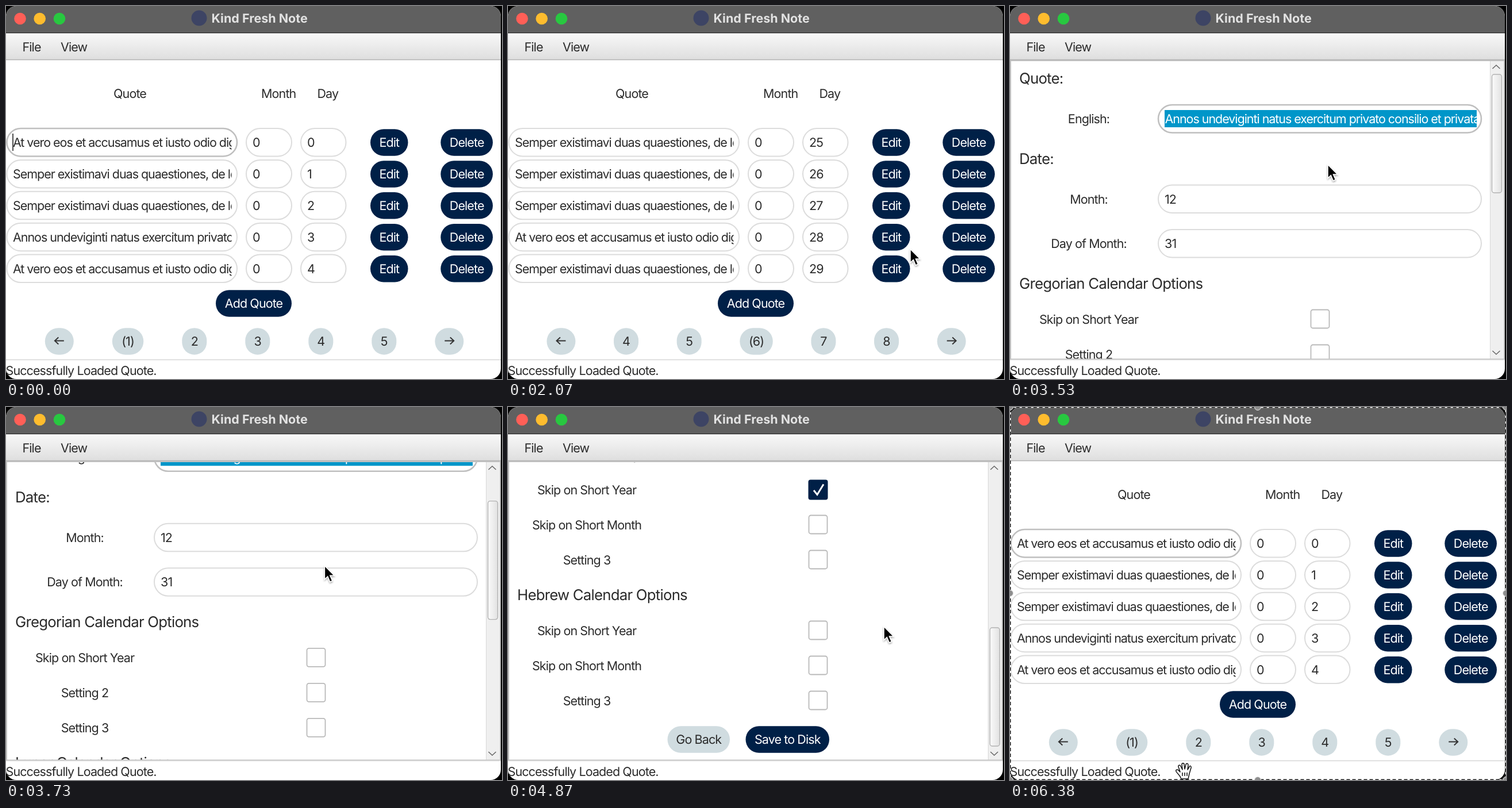
An HTML page for the animation above (6420 ms loop, 863 px wide and 649 px high).

```html
<!DOCTYPE html>
<html lang="en">
<head>
<meta charset="utf-8">
<title>Kind Fresh Note</title>
<style>
html, body { margin: 0; width: 100%; height: 100%; overflow: hidden; background: #000; }
svg { display: block; width: 863px; height: 649px; }
text { font: 21.5px Inter, Roboto, sans-serif; font-optical-sizing: none; letter-spacing: -.9px; fill: #2b2b2b; white-space: pre; text-rendering: geometricPrecision; }
.quote { letter-spacing: -1.04px; }
.head { font-size: 25.8px; letter-spacing: -.78px; }
.title { font-weight: 700; letter-spacing: 0; fill: #e2e2e2; }
.light { fill: #fff; }
.field { fill: #fff; stroke: #dcdcdc; stroke-width: 2; }
.focus { stroke: #bfbfbf; stroke-width: 2.6; }
.box { fill: #fff; stroke: #b9b9b9; stroke-width: 1.8; }
.line { fill: none; stroke: #333; stroke-width: 1.9; }
</style>
</head>
<body>
<svg viewBox="0 0 863 649">
  <defs>
    <linearGradient id="menu" x2="0" y2="1"><stop stop-color="#f8f8f8"/><stop offset="1" stop-color="#dedede"/></linearGradient>
    <linearGradient id="thumbFill"><stop stop-color="#fafafa"/><stop offset="1" stop-color="#e2e2e2"/></linearGradient>
    <clipPath id="window"><rect width="861" height="649" rx="18"/></clipPath>
    <clipPath id="quotes"><rect x="10" y="200" width="382.5" height="290"/></clipPath>
    <clipPath id="pane"><rect x="2" y="96" width="833" height="518"/></clipPath>
    <clipPath id="entry"><rect x="268" y="170" width="544" height="52"/></clipPath>
    <filter id="shadow" x="-50%" y="-50%" width="200%" height="200%"><feDropShadow dx="0" dy="2" stdDeviation="1.5" flood-opacity=".35"/></filter>
  </defs>
  <rect width="863" height="649"/>
  <g clip-path="url(#window)">
    <rect width="861" height="649" fill="#fff"/>
    <g id="list"></g>
    <g id="form">
      <g clip-path="url(#pane)"><g id="content"></g></g>
      <rect x="835" y="95" width="24" height="519" fill="#efefef"/>
      <path d="M835.5 95V614" stroke="#d8d8d8"/>
      <rect id="thumb" x="838.5" width="17" height="206" rx="4" fill="url(#thumbFill)" stroke="#b2b2b2" stroke-width="1.4"/>
      <path class="line" d="M839.5 109l6.5-6 6.5 6M839.5 600l6.5 6 6.5-6" style="stroke:#666;stroke-width:1.5"/>
      <rect x="1" y="95" width="859" height="519.5" fill="none" stroke="#c4c4c4" stroke-width="2"/>
    </g>
    <path d="M0 615.5H861" stroke="#d6d6d6" stroke-width="1.5"/>
    <text x="-.5" y="642">Successfully Loaded Quote.</text>
    <rect width="861" height="47" fill="#606060"/>
    <rect y="46" width="861" height="1.6" fill="#252525"/>
    <rect y="47.6" width="861" height="46" fill="url(#menu)"/>
    <path d="M0 93.5H861" stroke="#b3b3b3" stroke-width="1.5"/>
    <circle cx="24.500" cy="22" r="10.300" fill="#ff5f57"/>
    <circle cx="58.700" cy="22" r="10.300" fill="#febc2e"/>
    <circle cx="93" cy="22" r="10.300" fill="#28c840"/>
    <circle cx="336" cy="21" r="13.500" fill="#3d4464"/>
    <text class="title" x="357.500" y="29.300">Kind Fresh Note</text>
    <text x="28.500" y="78.500">File</text>
    <text x="95" y="78.500">View</text>
  </g>
  <g id="frame">
    <rect x=".7" y=".7" width="861.600" height="647.600" fill="none" stroke="#fff" stroke-width="1.500"/>
    <rect x=".7" y=".7" width="861.600" height="647.600" fill="none" stroke="#222" stroke-width="1.500" stroke-dasharray="6 4"/>
    <g id="grips" fill="#8e8e8e" stroke="#e8e8e8"></g>
  </g>
  <path id="arrow" d="M0 0V23.500L5.300 18.500 9.300 28 13.400 26.200 9.400 17H16.800Z" fill="#000" stroke="#fff" stroke-width="1.500" filter="url(#shadow)"/>
  <path id="hand" transform="translate(288 618)" d="M9 27C7 22 3 20 1 16C0 13 3 12 5 14L8 17L5 8C4 5 8 4 9 7L12 13L11 4C11 1 15 1 15 4L16 12L18 4C19 1 22 2 22 5L21 13L24 8C25 5 28 7 27 10L24 20L22 29H10ZM12 18V24M16 18V24M20 18V24" fill="#fff" stroke="#111" stroke-width="1.500" stroke-linejoin="round"/>
</svg>
<script>
const LOOP = 6420, NAVY = '#002047', PALE = '#d0dce0', DARK = '#b9c5ca';
const $ = id => document.getElementById(id);
const quotes = {
  T: 'At vero eos et accusamus et iusto odio dignissimos',
  S: 'Semper existimavi duas quaestiones, de legibus',
  A: 'Annos undeviginti natus exercitum privato consilio et privata impensa'
};
const order = 'TSSATASTSAATAATSATASTSATASSSTS';
const clicks = [790, 1020, 1260, 1490, 1720];
const OPEN = 2830, BACK = 5670, GRAB = 6330;
const track = [
  [250, 480, 660], [670, 763, 567], [1800, 763, 567], [2070, 700, 423],
  [2620, 683, 234], [2900, 683, 234], [3400, 553, 276], [3640, 553, 276],
  [4070, 565, 278], [4550, 610, 330], [4870, 654, 382], [5330, 331, 575],
  [5760, 331, 575], [6300, 300, 630]
];

const text = (x, y, s, cls = '', anchor = 'start') =>
  `<text x="${x}" y="${y + 8}" class="${cls}" text-anchor="${anchor}">${s}</text>`;
const mid = (x, y, s, cls) => text(x, y, s, cls, 'middle');
const rect = (x, y, w, h, r, attr) =>
  `<rect x="${x}" y="${y}" width="${w}" height="${h}" rx="${r}" ${attr}/>`;
const field = (x, y, w, focus) =>
  rect(x, y - 24, w, 48.5, 24.2, `class="field ${focus ? 'focus' : ''}"`);
const button = (x, y, w, s, fill = NAVY, id = '') =>
  rect(x, y - 23.3, w, 46.5, Math.min(23.2, w / 2), `fill="${fill}" id="${id}"`) +
  mid(x + w / 2, y - .7, s, fill === NAVY ? 'light' : '');

// Pager buttons share the leftover width evenly.
function pager(page) {
  const first = Math.max(1, page - 2), items = [['left', 50]];
  for (let n = first; n < first + 5; n++) {
    const w = n === 1 ? 40 : 43;
    items.push(n === page ? [`(${n})`, w + 14.5] : [n, w]);
  }
  items.push(['right', 50]);
  const gap = (862.5 - items.reduce((a, i) => a + i[1], 0)) / 8;
  let x = gap + .8, out = '';
  for (const [s, w] of items) {
    const c = x + w / 2, isArrow = w === 50, d = s === 'left' ? -1 : 1;
    out += button(x, 583.5, w, isArrow ? '' : s, PALE, s === 'right' ? 'next' : '');
    if (isArrow) out += `<path class="line" d="M${c - 8 * d} 582.5h${16 * d}m${-6.5 * d} -6l${6.5 * d} 6l${-6.5 * d} 6"/>`;
    x += w + gap;
  }
  return out;
}

function listView(page) {
  let out = mid(215.5, 152, 'Quote') + mid(474.2, 152, 'Month') + mid(559.8, 152, 'Day');
  let words = '';
  for (let i = 0; i < 5; i++) {
    const y = 237 + i * 54.9, day = (page - 1) * 5 + i;
    out += field(1.5, y, 400.5, page === 1 && i === 0) + field(418, y, 79, 0) + field(513, y, 78.5, 0);
    out += text(429, y, 0) + text(524, y, day);
    out += button(634, y + .6, 65.5, 'Edit', NAVY) + button(756.3, y + .6, 90.7, 'Delete');
    words += text(12, y, quotes[order[day]], 'quote');
  }
  out += `<g clip-path="url(#quotes)">${words}</g>`;
  if (page === 1) out += '<path id="caret" d="M12 222V252" stroke="#222" stroke-width="1.6"/>';
  return out + button(365, 517.5, 132, 'Add Quote') + pager(page);
}

function formView() {
  let out = text(16, 127, 'Quote:', 'head') + mid(137, 196, 'English:') + field(258, 196, 562, 1);
  out += `<g clip-path="url(#entry)">${rect(269, 181, 545, 30, 0, 'fill="#0096c9"')}${text(269.5, 196, quotes.A, 'quote light')}</g>`;
  out += text(16, 267, 'Date:', 'head');
  out += mid(137, 336, 'Month:') + field(258, 335.5, 562, 0) + text(269, 336, 12);
  out += mid(137, 413, 'Day of Month:') + field(258, 413, 562, 0) + text(269, 413, 31);
  ['Gregorian', 'Lunar', 'Hebrew'].forEach((name, g) => {
    const top = 484 + g * 245;
    out += text(16, top, name + ' Calendar Options', 'head');
    ['Skip on Short Year', g ? 'Skip on Short Month' : 'Setting 2', 'Setting 3'].forEach((s, i) => {
      const y = top + 61 * (i + 1);
      out += mid(137, y, s);
      out += g === 1 && i === 0
        ? rect(522.5, y - 17.5, 34, 35, 4, `fill="${NAVY}"`) +
          `<path d="M532 ${y + 1}l6 7.500 11-18" fill="none" stroke="#fff" stroke-width="3"/>`
        : rect(523.5, y - 16.5, 32, 32, 3.5, 'class="box"');
    });
  });
  return out + button(277.5, 1224.5, 108.5, 'Go Back', PALE, 'back') + button(413.5, 1224.5, 145.5, 'Save to Disk');
}

function cursorAt(t) {
  let i = 1;
  while (i < track.length - 1 && track[i][0] < t) i++;
  const [a, x, y] = track[i - 1], [b, u, v] = track[i];
  const k = Math.max(0, Math.min(1, (t - a) / (b - a))), e = k * k * (3 - 2 * k);
  return [x + (u - x) * e, y + (v - y) * e];
}

const show = (id, on) => $(id).setAttribute('display', on ? 'inline' : 'none');
let shown = 0;

function draw(t) {
  const inForm = t >= OPEN && t < BACK;
  const page = t >= BACK ? 1 : 1 + clicks.filter(c => t >= c).length;
  if (page !== shown) $('list').innerHTML = listView(shown = page);
  show('list', !inForm);
  show('form', inForm);

  const u = Math.max(0, Math.min(1, (t - 3640) / 1034));
  const scroll = 646 * (1 - (1 - u) ** 2);
  $('content').setAttribute('transform', `translate(0 ${-scroll})`);
  $('thumb').setAttribute('y', 119 + scroll * 265 / 646);

  const [x, y] = cursorAt(t);
  $('arrow').setAttribute('transform', `translate(${x} ${y})`);
  show('arrow', t >= 250 && t < GRAB);
  show('hand', t >= GRAB);
  show('frame', t >= GRAB);

  const overNext = t > 300 && x > 745 && x < 795 && y > 560 && y < 607;
  $('next').setAttribute('fill', overNext ? DARK : PALE);
  const press = Math.max(0, Math.min(1, (t - 5370) / 160));
  $('back').setAttribute('fill', `rgb(${208 - 23 * press},${220 - 23 * press},${224 - 22 * press})`);
  if (page === 1) show('caret', t < 500 || (t >= BACK && t < 6170));
}

$('content').innerHTML = formView();
for (const gx of [0, 431, 863]) for (const gy of [0, 324, 649])
  if (gx !== 431 || gy !== 324) $('grips').innerHTML += `<circle cx="${gx}" cy="${gy}" r="5.5"/>`;

const start = performance.now();
function tick() {
  draw((performance.now() - start) % LOOP);
  requestAnimationFrame(tick);
}
tick();
</script>
</body>
</html>
```
